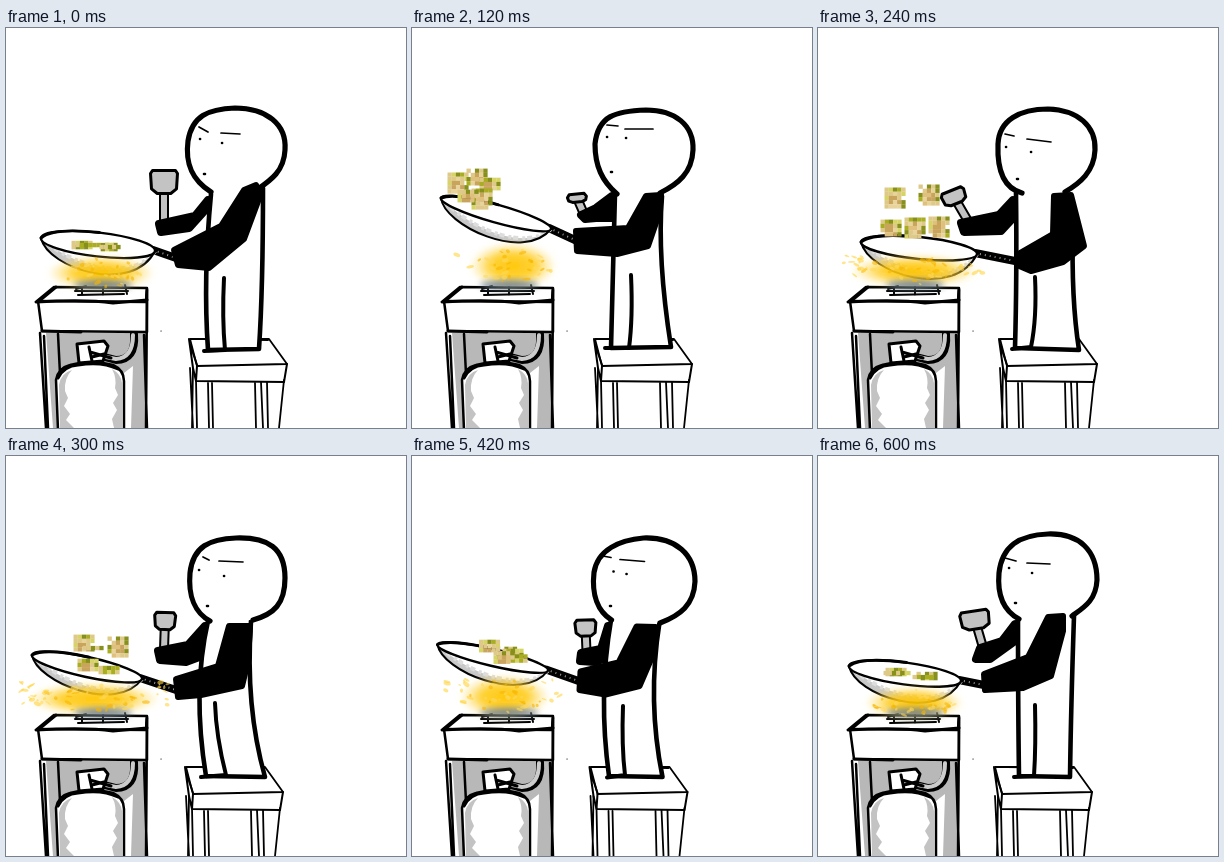
Animation, 400 px wide and 400 px high, one loop 660 ms. Source, as an HTML page:

```html
<!DOCTYPE html>
<html lang="en">
<head>
<meta charset="utf-8">
<title>Cook tossing a pan</title>
<style>
  html, body { margin: 0; width: 100%; height: 100%; overflow: hidden; background: #fff; }
  svg { display: block; width: 100vw; height: 100vh; }
  .line { fill: none; stroke: #000; stroke-linecap: round; stroke-linejoin: round; }
  .white { fill: #fff; }
</style>
</head>
<body>
<svg viewBox="0 0 400 400">
  <defs>
    <filter id="soft" x="-30%" y="-50%" width="160%" height="200%"><feGaussianBlur stdDeviation="3"/></filter>
    <radialGradient id="flame">
      <stop offset="0" stop-color="#ffc400" stop-opacity=".95"/>
      <stop offset=".55" stop-color="#ffca14" stop-opacity=".85"/>
      <stop offset="1" stop-color="#ffdf70" stop-opacity=".1"/>
    </radialGradient>
  </defs>

  <g id="stove" class="line" stroke-width="2.5">
    <path d="M38 305H140V400H42Z" fill="#b8b8b8" stroke="none"/>
    <path d="M35 305H40L47 400H40Z M118 345L127 338L125 400H118Z" class="white" stroke="none"/>
    <path d="M52 402L50 352Q52 340 64 337Q85 331 107 337Q118 342 118 353V402Z" class="white"/>
    <path d="M54 400L53 357Q55 345 66 342Q58 350 59 363L62 370L58 378L64 386L60 392L68 400Z
             M116 400V355Q115 346 106 341Q111 350 109 360L112 367L107 375L111 382L106 391L108 400Z" fill="#c3c3c3" stroke="none"/>
    <path d="M52 350Q58 338 72 337Q96 333 112 341" stroke-width="3"/>
    <path d="M87 326L110 332Q130 332 128 306" stroke-width="8"/>
    <path d="M90 327L110 331Q127 330 127 307" stroke="#ccc" stroke-width="4"/>
    <path d="M71 316L98 313L102 318L97 333L73 335Z" class="white" stroke-width="3"/>
    <path d="M83 319L86 333M84 324L105 330M86 329L98 326" stroke-width="3"/>
    <path d="M48 259L141 260L140 274L31 273Z" class="white"/>
    <path d="M32 273L36 303L141 304V261L140 274Z" class="white"/>
    <path d="M30 274Q80 271 107 275L141 272M33 273L50 259M36 303L75 304" stroke-width="3"/>
    <path d="M34 305L40 400M38 308L42 400M141 262L140 400M138 307L141 400M52 306L54 346"/>
    <path d="M69 263H122M72 267L118 266M76 259V267M97 259V267M119 257L121 266M70 261L80 258" stroke-width="2"/>
    <path d="M155 303h.1" stroke-width="1.2"/>
  </g>
  <g id="scene"></g>
</svg>
<script>
const FRAME_MS = 60, FRAMES = 11;
const keys = [0, 2, 4, 5, 6, 8, 10];

// Every track holds one pose per key; in-between steps are averaged.
const tracks = {
  stool: ["0", "-1", "-2", "-4", "-5", "-6", "-7"],
  head: [
    "M205 164C186 152 179 136 182 113C186 88 202 81 229 80C260 80 281 96 279 122C278 143 265 152 252 161",
    "M205 166C190 153 183 138 183 116C186 88 203 83 234 82C263 82 282 97 281 122C280 145 266 156 248 165",
    "M204 165C185 160 179 142 180 116C181 92 202 81 230 81C260 82 278 98 277 122C276 144 262 155 247 164",
    "M204 165C189 157 182 140 184 117C187 90 204 83 230 82C262 81 279 92 279 122C279 148 268 158 247 164",
    "M203 164C192 154 187 138 190 115C193 97 218 88 243 86C270 85 286 103 286 127C285 150 270 161 247 168",
    "M196 164C180 157 172 140 174 118C178 90 198 80 220 78C258 77 280 94 280 124C279 148 266 158 249 166",
    "M201 163C186 155 179 140 181 117C184 90 201 79 230 78C262 77 279 95 279 124C278 145 265 152 254 160"],
  brows: [
    "M193 99L202 104M215 105L234 106", "M195 97L206 98M213 101L241 101",
    "M187 106L196 108M209 111L233 114", "M197 101L203 104M213 105L237 106",
    "M194 98L203 101M211 102L234 103", "M182 101L195 102M205 105L231 108",
    "M187 102L198 105M209 107L232 108"],
  eyes: [
    "M194 111h.1M216 115h.1M198 146h1", "M195 109h.1M214 110h.1M199 144h1",
    "M188 119h.1M213 124h.1M199 151h1", "M193 114h.1M218 120h.1M201 150h1",
    "M215 117h.1M216 117h.1M199 149h1", "M188 114h.1M213 119h.1M197 151h1",
    "M191 112h.1M214 117h.1M197 147h1"],
  body: [
    "M205 166Q197 250 202 322L253 321Q257 260 257 160",
    "M203 165Q201 250 199 320L259 319Q245 230 250 168",
    "M198 165Q199 250 197 320L261 322Q253 270 255 200",
    "M202 165Q186 235 200 320L259 321Q239 250 245 165",
    "M203 163Q174 230 201 320L253 321Q224 240 246 168",
    "M195 165Q198 250 193 320L248 321Q246 250 249 165",
    "M200 160Q200 250 201 320L252 321Q253 250 256 160"],
  leg: [
    "M218 250Q216 290 219 322L198 323", "M219 247Q221 290 217 320L193 320",
    "M217 249Q219 290 213 319L194 321", "M209 247Q210 280 220 319L195 321",
    "M206 250Q205 290 212 318L202 322", "M216 250Q214 290 214 320L188 321",
    "M217 249Q218 290 216 320L196 321"],
  backArm: [
    "M202 172L189 188L153 196L155 204L183 200L201 180Z",
    "M200 168L184 180L169 187L173 191L184 190L200 190Z",
    "M195 172L181 187L143 195L146 204L183 203L195 190Z",
    "M199 170L182 189L152 195L154 204L180 206L196 200Z",
    "M200 168L190 190L172 196L171 204L180 206L190 206Z",
    "M192 172L188 196L166 198L165 206L185 206L192 200Z",
    "M197 168L184 185L162 192L158 203L172 203L197 185Z"],
  frontArm: [
    "M238 162L250 157L254 168L238 211L203 240L172 237L168 222L215 198Z",
    "M234 168L249 167L247 186L236 218L205 226L165 223L164 203L216 200Z",
    "M236 168L253 167L266 218L245 234L213 243L199 237L202 225L235 206Z",
    "M223 170L244 170L242 205L236 230L195 239L172 241L170 223L212 210Z",
    "M224 173L238 174L235 190L215 229L187 235L150 231L149 213L196 206Z",
    "M225 168L249 168L248 205L240 231L200 242L185 237L188 218L217 207Z",
    "M230 161L245 160L245 175L233 220L205 232L167 234L166 218L210 201Z"],
  // blade x y, width, height, tilt, grip x y
  spatula: [
    "158 154 27 23 0 158 192", "165 170 19 8 -5 172 186",
    "136 169 24 14 -22 150 193", "159 165 21 17 2 158 193",
    "184 171 21 15 2 180 194", "163 173 21 17 -5 169 197",
    "157 164 29 18 -9 164 188"],
  // rim ends, rim half height, depth
  pan: [
    "35 210 149 223 12 28", "29 170 139 201 9 24", "43 214 159 226 11 29",
    "26 199 136 223 10 24", "16 180 126 213 8 23", "35 197 146 216 9 24",
    "31 210 143 225 11 27"],
  grip: ["170 230", "163 212", "197 233", "170 234", "150 222", "183 228", "166 229"],
  // x, y, rows per chunk
  food: [
    "76 217 2 101 219 2 97 217 1 80 217 1 104 219 1",
    "46 155 5 65 149 4 78 156 3 70 171 5 56 168 3",
    "77 170 5 111 167 5 73 200 4 97 200 5 121 199 5",
    "78 187 4 112 191 5 82 209 3 103 214 2 87 192 1",
    "87 196 2 104 200 2 96 198 2 91 196 2 100 202 2",
    "68 184 4 85 194 4 106 200 4 119 209 2 84 201 3",
    "78 216 2 109 220 2 82 217 1 105 221 1 76 217 1"],
  // centre, radii, spark count
  fire: [
    "95 245 52 17 0", "101 238 42 23 4", "96 243 62 16 22", "88 243 64 16 28",
    "92 242 45 19 20", "93 240 43 24 14", "96 247 48 16 0"]
};

const mix = (a, b) => {
  const other = b.match(/-?[\d.]+/g);
  let i = 0;
  return a.replace(/-?[\d.]+/g, n => (+n + +other[i++]) / 2);
};
const pose = (name, step) => {
  const track = tracks[name], i = keys.indexOf(step);
  if (i >= 0) return track[i];
  const next = keys.findIndex(k => k > step);
  return mix(track[next - 1], track[next]);
};
const nums = (name, step) => pose(name, step).split(" ").map(Number);
const random = seed => () => (seed = seed * 16807 % 2147483647) / 2147483647;
const line = (d, width, extra = "") => `<path class="line" d="${d}" stroke-width="${width}" ${extra}/>`;
const shape = (d, fill) => `<path d="${d}" fill="${fill}"/>`;
const solid = 'style="fill:#000"', blank = 'style="fill:#fff"';

function stool(step) {
  return `<g transform="translate(${pose("stool", step)})">
    ${line("M184 311L263 311L281 336L191 338Z", 1.8, blank)}
    ${line("M191 338L190 353L278 354L281 336M183 311L187 340L190 353M184 316L191 337M196 311L262 312", 2)}
    ${line("M184 340L187 400M187 340L186 400M190 352L191 400M202 355L203 400M206 355L207 400M249 355L250 400M255 354L257 400M261 354L262 400M278 352L273 400", 1.8)}
  </g>`;
}

function spatula(step) {
  const [x, y, w, h, tilt, gx, gy] = nums("spatula", step);
  const handle = `M${x} ${y}L${gx} ${gy}`, a = w / 2, b = h / 2;
  const blade = `M${-a + 2} ${-b}H${a - 2}L${a} ${-b + 3}L${a - 1} ${b * .6}L${a * .5} ${b}H${-a * .5}L${-a + 1} ${b * .6}L${-a} ${-b + 3}Z`;
  return line(handle, 10) + line(handle, 6, 'style="stroke:#c3c3c3"') +
    `<g transform="translate(${x} ${y}) rotate(${tilt})">${line(blade, 3, 'style="fill:#c3c3c3"')}</g>`;
}

function pan(step) {
  const [x1, y1, x2, y2, ry, depth] = nums("pan", step);
  const [gx, gy] = nums("grip", step);
  const r = Math.hypot(x2 - x1, y2 - y1) / 2, d = depth * 1.33;
  const tilt = Math.atan2(y2 - y1, x2 - x1) * 180 / Math.PI;
  const bowl = `M${-r} 0C${-r * .82} ${d * .8} ${r * .7} ${d * 1.25} ${r} 0`;
  const inner = `C${r * .7} ${d * .85} ${-r * .3} ${d * .75} ${-r} 0`;
  const grip = `M${x2 - 2} ${y2 - 1}L${gx} ${gy}`;
  return line(grip, 8) + line(grip, 2, 'style="stroke:#999;stroke-linecap:butt" stroke-dasharray="1 4"') +
    `<g transform="translate(${(x1 + x2) / 2} ${(y1 + y2) / 2}) rotate(${tilt})">
      ${shape(bowl + "Z", "#fff")}${shape(bowl + inner, "#c8c8c8")}
      ${line(`M${r} 0${inner}`, 4, 'style="stroke:#ddd;stroke-linecap:butt" stroke-dasharray="3 4 5 2"')}
      ${line(bowl, 2)}
      <ellipse class="line" style="fill:#fff" rx="${r}" ry="${ry}" stroke-width="2.4"/>
      ${line(`M${-r} 0Q${-r * .8} ${-ry} 0 ${-ry}`, 3)}
    </g>`;
}

function food(step) {
  const values = nums("food", step), size = 4.2;
  const colors = ["#dfc07c", "#e8d39a", "#c9a45c", "#dfc988", "#a9ad22", "#d6d465", "#87901d"];
  let out = "";
  for (let i = 0; i < values.length; i += 3) {
    const [x, y, rows] = values.slice(i, i + 3), rand = random(71 + i * 97);
    const count = Math.round(rows);
    for (let row = 0; row < count; row++) for (let col = 0; col < 5; col++) {
      const edge = row === 0 || col === 0 || col === 4;
      const color = colors[Math.floor(rand() * 4 + (edge || count < 3 ? 3 : 0))];
      if (edge && rand() < .15) continue;
      out += `<rect x="${x + (col - 2.5) * size}" y="${y + (row - count / 2) * size}" width="4.3" height="4.3" fill="${color}"/>`;
    }
  }
  return out;
}

function fire(step) {
  const [x, y, rx, ry, sparks] = nums("fire", step), rand = random(step * 311 + 43);
  const fleck = (fx, fy, color) =>
    `<ellipse cx="${fx}" cy="${fy}" rx="${1 + rand() * 3}" ry="${.7 + rand() * 1.5}" fill="${color}" opacity=".6" transform="rotate(${rand() * 80 - 40} ${fx} ${fy})"/>`;
  let out = `<ellipse cx="${x}" cy="${y}" rx="${rx}" ry="${ry}" fill="url(#flame)" filter="url(#soft)"/>
    <ellipse cx="97" cy="257" rx="29" ry="5" fill="#566b80" opacity=".75" filter="url(#soft)"/>`;
  for (let i = 0; i < 34; i++) {
    const angle = rand() * 7, reach = Math.sqrt(rand()) * .85;
    out += fleck(x + Math.cos(angle) * rx * reach, y + Math.sin(angle) * ry * reach, i % 2 ? "#f6b500" : "#ffd95c");
  }
  for (let i = 0; i < sparks; i++) {
    const side = i % 3 ? -1 : 1;
    out += fleck(x + side * (rx * .75 + rand() * 26), y - 18 + rand() * 24, "#ffd340");
  }
  return out;
}

function figure(step) {
  const skull = pose("head", step);
  return line(pose("body", step), 4.6, blank) + line(pose("leg", step), 4) +
    shape(skull + "Z", "#fff") + line(skull, 5.2) +
    line(pose("brows", step), 1.7) + line(pose("eyes", step), 2.6) +
    line(pose("frontArm", step), 6, solid);
}

const scene = document.getElementById("scene");
let shown = -1;
function draw(now) {
  const step = Math.floor(now / FRAME_MS) % FRAMES;
  if (step !== shown) {
    shown = step;
    scene.innerHTML = stool(step) + spatula(step) + line(pose("backArm", step), 8, solid) +
      pan(step) + food(step) + fire(step) + figure(step);
  }
}
const start = performance.now();
function tick() {
  draw(performance.now() - start);
  requestAnimationFrame(tick);
}
tick();
</script>
</body>
</html>
```
